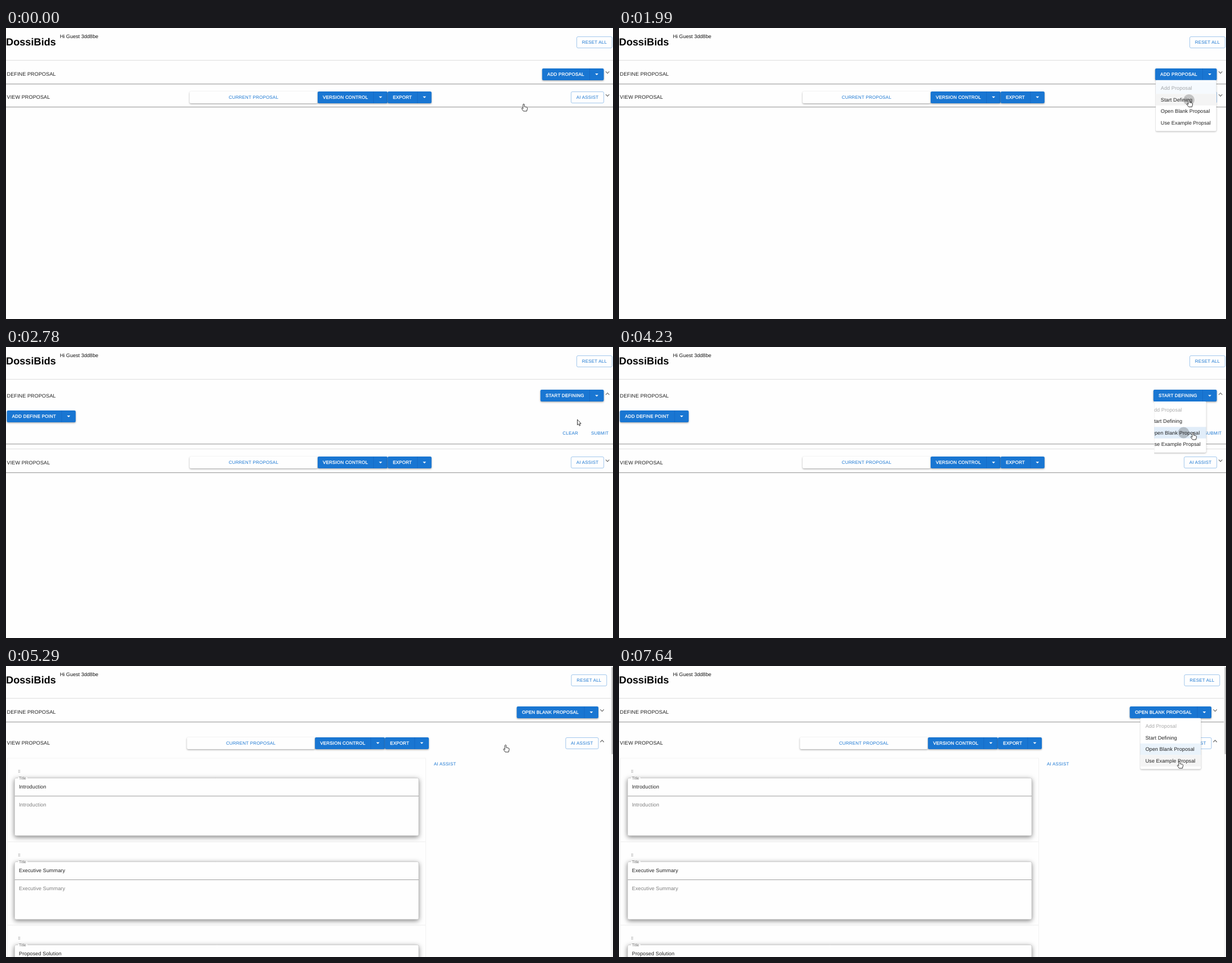
An HTML page with a canvas that plays this animation: 1081x518 px, repeating every 8000 ms.

```html
<!DOCTYPE html>
<html lang="en">
<head>
<meta charset="utf-8">
<title>Proposal builder</title>
<style>
html, body { margin: 0; width: 100%; height: 100%; overflow: hidden; background: #fefefe; }
canvas { display: block; }
</style>
</head>
<body>
<canvas id="stage" width="1081" height="518"></canvas>
<script>
const ctx = document.getElementById('stage').getContext('2d');
const LOOP = 8000, STEP = 120, PAPER = '#fefefe', BLUE = '#1976d2', INK = 'rgba(0,0,0,.87)';
const BODY = 9.1, CAPTION = 7.96, CARD_STEP = 148.7, ROW = 20.5, MENU_W = 108, MENU_H = 91;
const ITEMS = ['Add Proposal', 'Start Defining', 'Open Blank Proposal', 'Use Example Propsal'];
const CARDS = ['Introduction', 'Executive Summary', 'Proposed Solution'];

// Pointer strokes: each bends towards a control point on its way to the next rest
const START = [922, 135];
const STROKES = [
  { at: 100, bend: [531, 112], to: [1056, 75] },
  { at: 1060, bend: [1054, 86], to: [1015, 127.5] },
  { at: 1990, to: [1017.5, 129], span: 360 },
  { at: 2780, to: [1052, 84] },
  { at: 3630, to: [1022, 152], span: 360 },
  { at: 4230, bend: [1067, 81], to: [1049, 76] },
  { at: 5170, bend: [500, 290], to: [802, 245] },
  { at: 6070, bend: [1091, 82], to: [1047, 88] },
  { at: 6910, bend: [1044, 92], to: [998, 169] },
];

// shift: how far the list jumps when the choice widens its button
const MENUS = [
  { open: 1180, close: 2110, chosen: 0, shift: 0 },
  { open: 3500, close: 4350, chosen: 1, shift: -16.5 },
  { open: 7030, close: Infinity, chosen: 2, shift: 0 },
];

const HAND = new Path2D('M-1.2 1Q0-.8 1.2 1V5L5.4 6Q6.8 6.4 6.5 8.5L5.4 13H-.5L-3.6 8.6Q-3.6 7-2.5 7.4L-1.2 8.6Z');
const ARROW = new Path2D('M0 0V9.8L2.2 7.9L3.7 11.3L5.2 10.6L3.8 7.3H6.6Z');
const BEAM = new Path2D('M-2-5H2M0-5V5M-2 5H2');

const clamp = x => Math.max(0, Math.min(1, x));
const smooth = x => (x = clamp(x)) * x * (3 - 2 * x);

// The picture advances in even steps counted from the start of each stroke
function stepTime(t) {
  const stroke = STROKES.findLast(s => s.at <= t);
  return stroke ? stroke.at + Math.floor((t - stroke.at) / STEP) * STEP : 0;
}

function pointerAt(t) {
  const i = STROKES.findLastIndex(s => s.at <= t);
  if (i < 0) return START;
  const from = i ? STROKES[i - 1].to : START;
  const { at, to, bend, span = 720 } = STROKES[i];
  const p = clamp((t - at) / span), q = 1 - p;
  return from.map((a, axis) => {
    const c = bend ? bend[axis] : (a + to[axis]) / 2;
    return q * q * a + 2 * p * q * c + p * p * to[axis];
  });
}

function setFont(size, weight = '', spacing = 0) {
  ctx.font = `${weight} ${size}px "Liberation Sans", Arial, sans-serif`;
  ctx.letterSpacing = spacing * size + 'px';
}

// y is the middle of the capitals
function text(s, x, y, color = INK, size = BODY, weight = '', spacing = .0094) {
  setFont(size, weight, spacing);
  ctx.fillStyle = color;
  ctx.fillText(s, x, y + size * .33);
}

function caption(s, x, y, color = BLUE) {
  text(s, x, y, color, CAPTION, '', .02857);
  if (color === '#fff') {
    ctx.strokeStyle = color;
    ctx.lineWidth = .3;
    ctx.strokeText(s, x, y + CAPTION * .33);
  }
}

function captionWidth(s) {
  setFont(CAPTION, '', .02857);
  return ctx.measureText(s).width;
}

function rect(x, y, w, h, fill) {
  ctx.fillStyle = fill;
  ctx.fillRect(x, y, w, h);
}

function box(x, y, w, h, fill, stroke, r = 2.3) {
  ctx.beginPath();
  ctx.roundRect(x, y, w, h, r);
  if (fill) { ctx.fillStyle = fill; ctx.fill(); }
  if (stroke) { ctx.strokeStyle = stroke; ctx.lineWidth = .8; ctx.stroke(); }
}

function raised(x, y, w, h, fill, blur = 3, drop = 1.2, alpha = .35) {
  ctx.save();
  ctx.shadowColor = `rgba(0,0,0,${alpha})`;
  ctx.shadowBlur = blur;
  ctx.shadowOffsetY = drop;
  box(x, y, w, h, fill);
  ctx.restore();
}

function circle(x, y, r, fill) {
  ctx.beginPath();
  ctx.arc(x, y, r, 0, 7);
  ctx.fillStyle = fill;
  ctx.fill();
}

function clipped(x, y, w, h, draw) {
  ctx.save();
  ctx.beginPath();
  ctx.rect(x, y, w, h);
  ctx.clip();
  draw();
  ctx.restore();
}

const buttonTop = cy => Math.round(cy - 10.4);
const splitWidth = label => captionWidth(label) + 44.3;

// Draws a button with a dropdown arrow and returns its right end
function splitButton(label, x, cy) {
  const w = splitWidth(label), top = buttonTop(cy), ax = x + w - 12.6;
  raised(x, top, w, 21, BLUE);
  rect(x + w - 25.4, top, .7, 21, '#1565c0');
  caption(label, x + 9.3, cy, '#fff');
  ctx.fillStyle = '#fff';
  ctx.beginPath();
  ctx.moveTo(ax - 2.9, cy - 1.2);
  ctx.lineTo(ax + 2.9, cy - 1.2);
  ctx.lineTo(ax, cy + 1.7);
  ctx.fill();
  return x + w;
}

function outlined(label, right, cy) {
  const w = captionWidth(label) + 18.6;
  box(right - w, buttonTop(cy) + .5, w, 20, null, 'rgba(25,118,210,.5)');
  caption(label, right - w + 9.3, cy);
}

function chevron(x, y, up) {
  const d = up ? -1.7 : 1.7;
  ctx.beginPath();
  ctx.moveTo(x - 3.2, y - d);
  ctx.lineTo(x, y + d);
  ctx.lineTo(x + 3.2, y - d);
  ctx.strokeStyle = 'rgba(0,0,0,.6)';
  ctx.lineWidth = 1.1;
  ctx.stroke();
}

function edge(y, w) {
  rect(0, Math.floor(y), w, 1, '#a6a6a6');
  rect(0, Math.floor(y) + 1, w, 1, '#e6e6e6');
}

function card(title, y, hovered) {
  const line = hovered ? '#333' : '#c4c4c4';
  box(2.5, y - 35, 745, CARD_STEP, null, '#f0f0f0', 0);
  for (let i = 0; i < 6; i++) rect(22 + i % 2 * 2, y - 14 + (i >> 1) * 2, 1, 1, '#888');
  raised(15, y, 720, 103, PAPER, 9, 2.5, .5);
  box(15.5, y + .5, 719.5, 102.5, PAPER, line);
  rect(15.5, y + 32, 719.5, 1, hovered ? line : '#a0a0a0');
  rect(21.5, y - 1, 16.5, 2.5, PAPER);
  text('Title', 23, y + .3, 'rgba(0,0,0,.6)', 6.8);
  text(title, 23, y + 16.3);
  text(title, 23, y + 47.8, 'rgba(0,0,0,.5)');
}

function list(x, y, chosen, hover) {
  raised(x, y, MENU_W, MENU_H, '#fff', 3, 1, .3);
  ITEMS.forEach((label, i) => {
    const top = y + 4.4 + i * ROW, disabled = i === 0;
    let fill = i === hover ? '#f4f4f4' : null;
    if (i === chosen) fill = `rgba(25,118,210,${disabled ? .04 : i === hover ? .13 : .09})`;
    if (fill) rect(x, top, MENU_W, ROW, fill);
    text(label, x + 9.1, top + ROW / 2, disabled ? 'rgba(0,0,0,.34)' : INK);
  });
}

function drawMenu({ open, close, chosen, shift }, t, center, top, [px, py]) {
  const grow = t < open + STEP / 2 ? .75 : 1;
  const picked = t >= close - STEP && t < close;
  const jump = picked ? shift : 0, x = center - MENU_W / 2;
  const row = Math.floor((py - top - 4.4) / ROW);
  const hover = row > 0 && grow === 1 ? row : -1;
  ctx.save();
  ctx.globalAlpha = t >= close ? .4 : grow;
  ctx.translate(center, top);
  ctx.scale(.85 + .15 * grow, .9 + .1 * grow);
  ctx.translate(-center, -top);
  clipped(x - 1, top, MENU_W + 4, MENU_H + 5, () => {
    list(x + jump, top, jump ? hover : chosen, hover);
    if (picked) circle(px + jump, py + .5, 10, 'rgba(0,0,0,.2)');
  });
  ctx.restore();
}

function pointer(x, y, shape) {
  ctx.save();
  ctx.translate(x, y);
  ctx.lineJoin = 'round';
  ctx.lineWidth = .9;
  ctx.strokeStyle = '#222';
  ctx.fillStyle = '#fff';
  if (shape !== BEAM) ctx.fill(shape);
  ctx.stroke(shape);
  ctx.restore();
}

function render(t) {
  const viewing = t > 4230 ? 1 : 0;
  const define = smooth((t - 2020) / 300) - smooth((t - 4230) / 258);
  const reveal = smooth((t - 4230) / 538);
  const pageHeight = 170 + 1560 * reveal;
  const scrolls = pageHeight > 518;
  const W = scrolls ? 1071.4 : 1081, lineEnd = scrolls ? 1077.5 : 1081;
  const right = W - 16.4;
  const label = (t < 2110 ? ITEMS[0] : t < 4350 ? ITEMS[1] : ITEMS[2]).toUpperCase();
  const defineY = 82.2 + 4.4 * define, defineEnd = 99.4 + 73.5 * define;
  const viewTop = defineEnd + 9 * Math.max(define, viewing);
  const viewY = viewTop + 23.6 + 5 * viewing;
  const tip = pointerAt(t), [px, py] = tip;

  rect(0, 0, 1081, 518, PAPER);
  text('DossiBids', 0, 25, '#000', 18.2, 'bold', 0);
  text('Hi Guest 3dd8be', 96, 14.6, '#111', BODY, '', 0);
  outlined('RESET ALL', W - 1.6, 25.7);
  rect(0, 57, lineEnd, 1, '#dedede');

  text('DEFINE PROPOSAL', 1.5, defineY);
  const buttonW = splitWidth(label);
  splitButton(label, right - buttonW, defineY);
  chevron(W - 9.8, defineY - 3.2, define > .5);
  clipped(0, 100, 1081, Math.max(0, defineEnd - 100), () => {
    splitButton('ADD DEFINE POINT', 1.5, 123.3);
    caption('CLEAR', 991.3, 153.3);
    caption('SUBMIT', 1042, 153.3);
  });
  edge(defineEnd, lineEnd);
  if (!viewing) rect(0, Math.floor(viewTop - .9), lineEnd, 1, `rgba(0,0,0,${.13 * define})`);

  text('VIEW PROPOSAL', 1.5, viewY);
  const left = W / 2 - 213.5;
  raised(left, buttonTop(viewY), 228, 21, PAPER);
  caption('CURRENT PROPOSAL', left + 69.7, viewY);
  splitButton('EXPORT', splitButton('VERSION CONTROL', left + 228, viewY), viewY);
  outlined('AI ASSIST', right, viewY);
  chevron(W - 9.8, viewY - 3.2, viewing);

  const content = viewY + 18, shown = 1560 * reveal;
  if (viewing) clipped(0, content, 1081, shown, () => {
    CARDS.forEach((title, i) => {
      const y = Math.floor(viewY + 62.5 + i * CARD_STEP);
      card(title, y, px < 735 && py > y && py < y + 103);
    });
    caption('AI ASSIST', 762, viewY + 37);
  });
  edge(viewing ? content + shown : viewTop + 41.4, lineEnd);

  if (scrolls) {
    rect(1077.5, 0, 3.5, 518, '#f5f5f5');
    box(1078.5, 2, 2.5, 518 * 518 / pageHeight, '#bbb', null, 1);
  }

  const pressed = MENUS.some(m => t >= m.open - STEP && t < m.open);
  if (pressed) clipped(right - 25, buttonTop(defineY), 25, 21,
    () => circle(px, py, 10, 'rgba(255,255,255,.25)'));
  const menu = MENUS.find(m => t >= m.open && t < m.close + STEP);
  if (menu) drawMenu(menu, t, right - buttonW / 2, defineY + 10.3, tip);

  let shape = HAND;
  if (!menu && define > .5 && py > 104) shape = ARROW;
  if (!menu && viewing && py > 160) shape = px < 735 && py > 200 ? BEAM : ARROW;
  pointer(px, py, shape);
}

ctx.textRendering = 'geometricPrecision';
const began = performance.now();
function tick(now) {
  render(stepTime(Math.max(0, now - began) % LOOP));
  requestAnimationFrame(tick);
}
requestAnimationFrame(tick);
</script>
</body>
</html>
```
